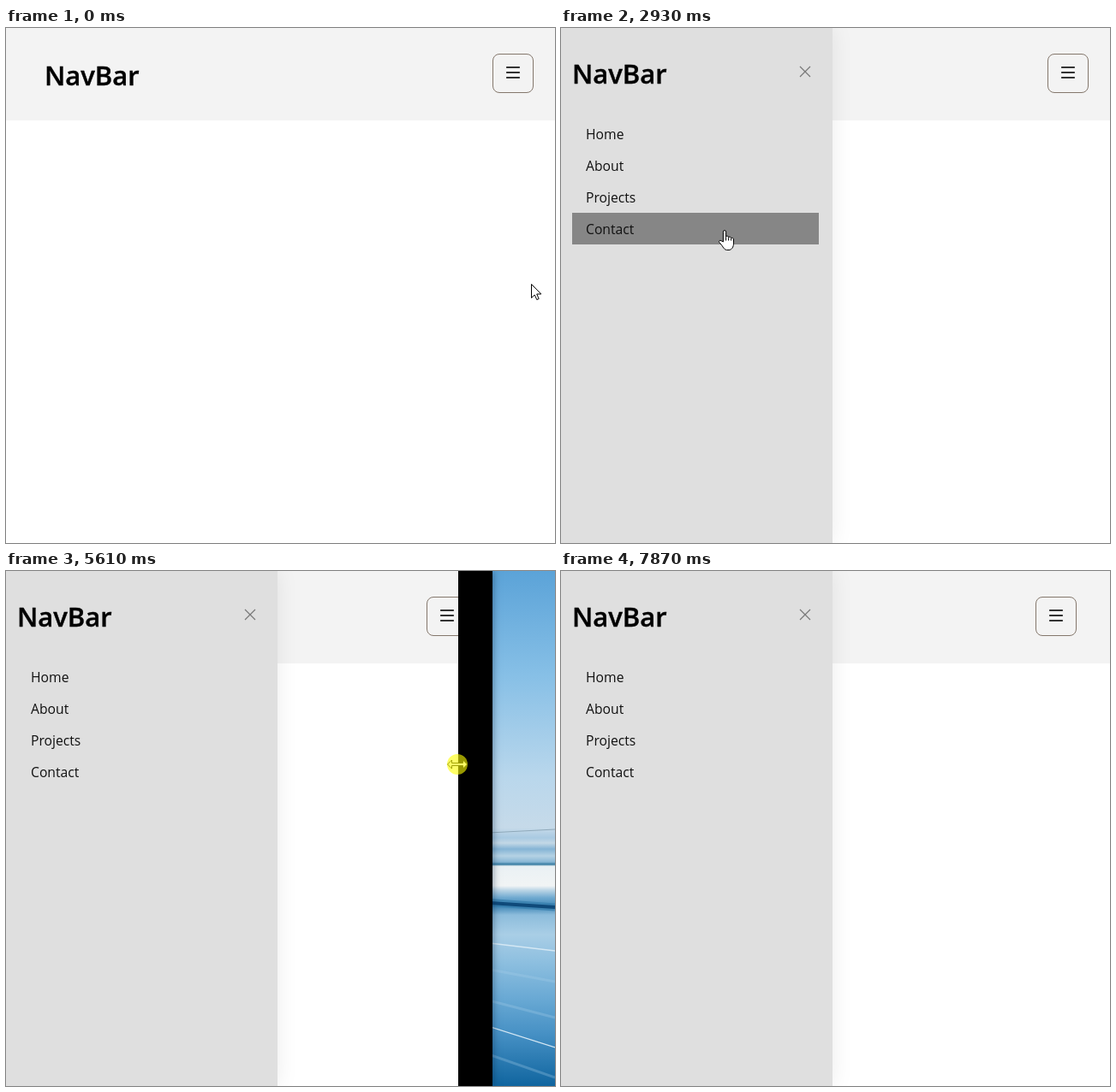
Write an HTML page that moves like this. It is 641 px wide and 602 px high and loops after 8000 ms.

```html
<!DOCTYPE html>
<html lang="en">
<head>
<meta charset="utf-8">
<title>Responsive side menu</title>
<style>
html, body { margin: 0; width: 100%; height: 100%; overflow: hidden; }
body { position: relative; background: #fff; color: #000; font: 16px "Open Sans", "Noto Sans", sans-serif; }
body * { box-sizing: border-box; }
svg { position: absolute; overflow: visible; }

.wall, .frame, .window, .page, .panel, .title, .toggle, .cursor { position: absolute; }
.frame, .window, .page, .panel, .toggle, .hover, .close, .cursor, .cursor g {
  animation: 8s linear infinite;
}

/* Desktop and window */
.wall {
  inset: 0;
  background: linear-gradient(#5ba3d8, #86bfe6 120px, #b9d7ec 240px, #c6dae9 300px, #a9cae2 312px,
    #c3d8e6 318px, #85b4d5 325px, #b5d2e4 333px, #8ab8d6 340px, #33799f 343px, #eaf1f4 345px,
    #f1f4f5 368px, #bcd6e6 373px, #6fa9d0 382px, #3f86b5 392px, #8dbddc 402px, #a9cee6 425px,
    #8fc0e0 455px, #69a9d4 500px, #4791c5 540px, #10659f 602px);
}
.frame { height: 100%; background: #000; box-shadow: 0 0 9px rgba(0, 30, 60, .5); animation-name: frame; }
.window {
  height: 100%; overflow: hidden;
  background: linear-gradient(#f3f3f3 108px, #fff 0);
  animation-name: window;
}
.page { height: 100%; animation-name: page; }

@keyframes frame {
  0%, 58.75% { width: 641px }
  61.5% { width: 623px }
  64.75% { width: 612px }
  70.125% { width: 568px }
  75.125% { width: 531px }
  75.875%, 82.25% { width: 506px }
  91.5% { width: 630px }
  92.625%, 100% { width: 650px }
}
@keyframes window {
  0%, 55.25% { width: 641px }
  61.5% { width: 612px }
  70.125% { width: 528px }
  75.125%, 83% { width: 506px }
  91.5% { width: 556px }
  92.625% { width: 600px }
  95%, 100% { width: 641px }
}
@keyframes page {
  0%, 61.5% { width: 641px }
  64.75% { width: 615px }
  70.125% { width: 564px }
  75.125% { width: 512px }
  75.875% { width: 509px }
  77.625%, 83% { width: 506px }
  91.5% { width: 556px }
  92.625% { width: 575px }
  98.375%, 100% { width: 627px }
}

/* Page content */
.title { font-size: 31px; font-weight: 600; line-height: 40px; white-space: nowrap; -webkit-text-stroke: .4px; }
.page > .title { left: 45px; top: 35px; }
.panel > .title { left: 13px; top: 33px; }

.toggle {
  right: 25px; top: 30px; width: 48px; height: 46px;
  border: 1px solid #84776c; border-radius: 8px;
  animation-name: raise;
}
.toggle svg { left: 15px; top: 14px; }
@keyframes raise {
  0%, 5.8% { box-shadow: none }
  5.875%, 19.4% { box-shadow: 1px 1px 3px rgba(0, 0, 0, .25) }
  20.3%, 100% { box-shadow: none }
}

.panel {
  left: 0; top: 0; height: 100%; background: #dfdfdf;
  box-shadow: 0 0 24px rgba(0, 0, 0, .08);
  animation-name: slide, stretch;
}
@keyframes slide {
  0%, 11.125% { transform: translateX(-100%); visibility: hidden; animation-timing-function: ease-in-out }
  18.875%, 100% { transform: none; visibility: visible }
}
@keyframes stretch {
  0%, 100% { width: 317px; animation-timing-function: step-end }
  72.5% { width: 100%; animation-timing-function: step-end }
  92.55% { width: 317px; animation-timing-function: step-end }
}
.close { right: 26px; top: 45px; animation-name: reveal; }
@keyframes reveal {
  0%, 16% { opacity: .4 }
  22%, 100% { opacity: 1 }
}

ul { position: absolute; left: 13px; right: 16px; top: 105px; margin: 0; padding: 0; list-style: none; }
li { height: 37px; padding-left: 16px; font-size: 15.7px; line-height: 38px; color: #111; }
.hover { animation-name: hover; animation-delay: var(--at); }
.hover.long { animation-name: linger; }
@keyframes hover {
  0%, 3.6%, 100% { background-color: rgba(134, 134, 134, 0) }
  .9%, 2.4% { background-color: #868686 }
}
@keyframes linger {
  0%, 6.9%, 100% { background-color: rgba(134, 134, 134, 0) }
  .9%, 3.8% { background-color: #868686 }
}

/* Pointer: the origin is its hot spot */
.cursor { left: 0; top: 0; width: 1px; height: 1px; animation-name: travel; }
.cursor g { animation-timing-function: step-end; }
.cursor .arrow { animation-name: arrow; }
.cursor .hand { animation-name: hand; }
.cursor .resize { animation-name: resize; }
.cursor .press { animation-name: press; }
@keyframes travel {
  0% { transform: translate(613px, 299px); animation-timing-function: step-end }
  .875% { transform: translate(615px, 262px); animation-timing-function: step-end }
  1.75% { transform: translate(609px, 165px); animation-timing-function: step-end }
  2.625% { transform: translate(601px, 76px); animation-timing-function: step-end }
  5.875%, 18.75% { transform: translate(594px, 64px) }
  20.375% { transform: translate(592px, 78px) }
  22% { transform: translate(590px, 84px) }
  26.875% { transform: translate(390px, 120px) }
  31.5% { transform: translate(186px, 152px) }
  34% { transform: translate(188px, 200px) }
  36%, 37% { transform: translate(190px, 236px) }
  39.25% { transform: translate(588px, 250px) }
  41.125% { transform: translate(627px, 250px) }
  41.875% { transform: translate(670px, 248px) }
  55.25% { transform: translate(655px, 232px) }
  61.5% { transform: translate(611px, 230px) }
  70.125% { transform: translate(527px, 226px) }
  75.125%, 82.25% { transform: translate(512px, 223px) }
  91.5% { transform: translate(636px, 222px) }
  93.75%, 100% { transform: translate(670px, 222px) }
}
@keyframes arrow {
  0%, 20.3%, 37.6% { opacity: 1 }
  5.875%, 28.9%, 41.875%, 100% { opacity: 0 }
}
@keyframes hand {
  0%, 20.3%, 37.6%, 100% { opacity: 0 }
  5.875%, 28.9% { opacity: 1 }
}
@keyframes resize {
  0%, 100% { opacity: 0 }
  55.25% { opacity: 1 }
}
@keyframes press {
  0%, 11.125%, 100% { opacity: 0 }
  9.125%, 55.25% { opacity: 1 }
}
</style>
</head>
<body>
<div class="wall">
  <svg width="641" height="602" fill="none">
    <path d="M506 309L641 302" stroke="#8fa9ba"/>
    <path d="M506 383L641 393" stroke="#2f78a8" stroke-width="9" stroke-opacity=".6"/>
    <path d="M506 384L641 393" stroke="#0f4a7a" stroke-width="4"/>
    <path d="M506 428L641 444M506 514L641 557" stroke="#d5e8f4" stroke-width="1.3"/>
    <path d="M506 455L641 480M506 487L641 522M506 545L641 592" stroke="#a5cde8" stroke-opacity=".3" stroke-width="3"/>
  </svg>
</div>
<div class="frame"></div>
<div class="window">
  <div class="page">
    <div class="title">NavBar</div>
    <div class="toggle">
      <svg width="16" height="14" stroke="#333" stroke-width="1.8" stroke-linecap="round"><path d="M.8 1H15.2M.8 7H15.2M.8 13H15.2"/></svg>
    </div>
    <div class="panel">
      <div class="title">NavBar</div>
      <svg class="close" width="12" height="12" stroke="#777" stroke-width="1.2"><path d="M0 0L12 12M12 0L0 12"/></svg>
      <ul>
        <li class="hover" style="--at: 2310ms">Home</li>
        <li class="hover" style="--at: 2430ms">About</li>
        <li class="hover" style="--at: 2632ms">Projects</li>
        <li class="hover long" style="--at: 2790ms">Contact</li>
      </ul>
    </div>
  </div>
</div>
<svg class="cursor" fill="#fff" stroke="#000" stroke-linejoin="round">
  <g class="resize"><path d="M-11.5 0L-6.5 -5V-1.5H6.5V-5L11.5 0L6.5 5V1.5H-6.5V5Z" stroke-width=".9"/></g>
  <g class="press"><circle r="12" fill="#ff0" fill-opacity=".6" stroke="none"/></g>
  <g class="arrow"><path d="M.5 .5V16.5L4.2 13L6.8 18.6L9.2 17.5L6.7 12H11.8Z"/></g>
  <g class="hand">
    <path d="M-.6 14V2.2a1.6 1.6 0 0 1 3.2 0V8.4c0-1.7 3-1.7 3 .1v.8c0-1.6 3-1.5 3 .3v.8c0-1.5 2.9-1.4 2.9.5v5c0 4-2.2 7.6-5.5 7.6H3.6C1 23.5-.6 20.6-2 18.3L-5.2 14.5c-1-1.7 1-3 2.4-1.7Z"/>
    <path d="M2.6 8.5v4M5.6 9.5v3M8.6 10.5v2" fill="none"/>
  </g>
</svg>
</body>
</html>
```
